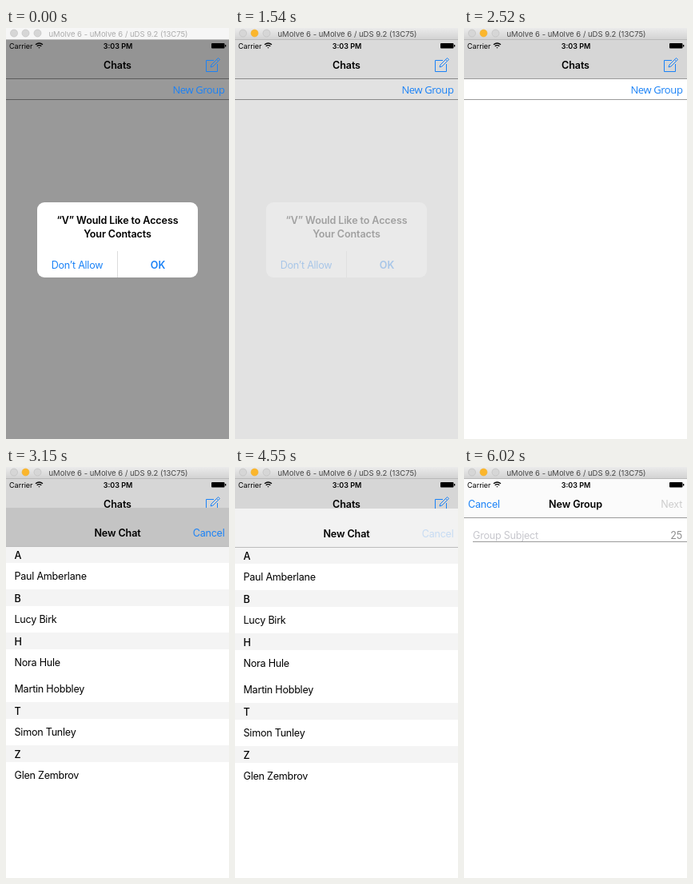
An HTML page that plays this animation: 279 px wide and 514 px high, repeating every 8000 ms.

```html
<!DOCTYPE html>
<html lang="en">
<head>
<meta charset="utf-8">
<title>Chats</title>
<style>
  html, body { margin: 0; width: 100%; height: 100%; overflow: hidden; background: #fff; }
  svg { display: block; width: 279px; height: 514px; }
  text { font: 400 12.6px Inter, "Open Sans", sans-serif; letter-spacing: -.02em; fill: #000; }
  .bold { font-weight: 600; letter-spacing: -.01em; }
  .letter { font-weight: 500; }
  .mid { text-anchor: middle; }
  .end { text-anchor: end; }
  .link { fill: #1a82f7; }
  .small { font-size: 9px; letter-spacing: 0; }
  .group { font: 400 13px "Open Sans", sans-serif; letter-spacing: -.03em; }
  .rule { stroke: #9a9a9a; }
  #windowTitle { font-size: 9.5px; letter-spacing: 0; }
</style>
</head>
<body>
<svg viewBox="0 0 279 514">
  <defs>
    <linearGradient id="chrome" x2="0" y2="1">
      <stop stop-color="#ebebeb"/><stop offset="1" stop-color="#d3d3d3"/>
    </linearGradient>
  </defs>

  <g id="chats">
    <rect y="15" width="279" height="499" fill="#fff"/>
    <rect id="chatsBar" y="15" width="279" height="48"/>
    <path class="rule" d="M0 63.5H279M0 89.5H279"/>
    <text class="bold mid" x="139.5" y="51">Chats</text>
    <rect id="dim" y="15" width="279" height="499"/>
    <g id="compose" fill="none" stroke="#1a82f7">
      <path d="M260 40.5H250.5V54.5H264.5V45"/>
      <path d="M256 49l1-3 8.500-8.500 2 2-8.500 8.500zM263.500 39.500l2 2"/>
    </g>
    <text id="newGroup" class="group link end" x="273.500" y="82">New Group</text>
  </g>

  <g id="contacts">
    <rect y="15" width="279" height="499" fill="#fff"/>
    <g id="list"></g>
    <rect id="contactsBar" y="15" width="279" height="48"/>
    <path class="rule" d="M0 63.5H279" opacity=".6"/>
    <text class="bold mid" x="139.5" y="51">New Chat</text>
    <text id="cancel" class="link end" x="273.500" y="51">Cancel</text>
  </g>

  <g id="subject">
    <rect y="15" width="279" height="499" fill="#fff"/>
    <rect y="15" width="279" height="48" fill="#fbfbfb"/>
    <path class="rule" d="M0 63.5H279M11 93.5H279"/>
    <text class="link" x="5" y="51">Cancel</text>
    <text class="bold mid" x="139.5" y="51">New Group</text>
    <text class="end" x="273" y="51" style="fill:#cdcdcd">Next</text>
    <text x="11" y="90" style="fill:#c7c7cd">Group Subject</text>
    <text class="end" x="273" y="90" style="fill:#8e8e8e">25</text>
  </g>

  <g id="status">
    <text class="small" x="4" y="26">Carrier</text>
    <g fill="none" stroke="#000" stroke-width="1.300">
      <path d="M37 20.800q4.500-3.600 9 0M38.700 22.700q2.800-2.200 5.600 0"/>
      <path d="M40.300 24.300h2.400l-1.200 1.200z" fill="#000" stroke="none"/>
    </g>
    <text class="small bold mid" x="140" y="26">3:03 PM</text>
    <rect x="257" y="19" width="16.500" height="6.500" rx="1"/>
    <rect x="274" y="21" width="1.300" height="2.500"/>
  </g>

  <g id="alert">
    <rect x="39" y="218" width="201" height="94" rx="9" fill="#fff"/>
    <path id="pressed" d="M139 279H240V303a9 9 0 0 1-9 9H139z" fill="#ebebeb"/>
    <path d="M139.5 279V312" stroke="#dcdcdc"/>
    <text class="bold mid" x="139.5" y="245">“V” Would Like to Access</text>
    <text class="bold mid" x="139.5" y="261.500">Your Contacts</text>
    <text class="link mid" x="89" y="300.500">Don’t Allow</text>
    <text class="link bold mid" x="190" y="300.500">OK</text>
  </g>

  <rect id="titleBar" width="279" height="14"/>
  <path d="M0 14.500H279" stroke="#b9b9b9"/>
  <g stroke-width=".6">
    <circle cx="10" cy="6.500" r="4.500" fill="#d6d6d6" stroke="#bdbdbd"/>
    <circle id="yellow" cx="24.500" cy="6.500" r="4.500"/>
    <circle cx="39.500" cy="6.500" r="4.500" fill="#d6d6d6" stroke="#bdbdbd"/>
  </g>
  <text id="windowTitle" x="53.500" y="10.500">uMolve 6 - uMolve 6 / uDS 9.2 (13C75)</text>
</svg>

<script>
  const LOOP = 8000, STEP = 70, TRAVEL = 499;
  const $ = id => document.getElementById(id);
  const set = (id, attr, value) => $(id).setAttribute(attr, value);
  const show = (id, on) => set(id, "visibility", on ? "visible" : "hidden");
  const gray = v => `rgb(${[v, v, v].map(Math.round)})`;
  const ramp = (t, from, to) => Math.min(1, Math.max(0, (t - from) / (to - from)));

  // Share of a critically damped spring's travel still to go.
  const remaining = (t, start, rate) => {
    const x = Math.max(0, t - start) / 1000 * rate;
    return (1 + x) * Math.exp(-x);
  };

  const sections = {
    A: ["Paul Amberlane"],
    B: ["Lucy Birk"],
    H: ["Nora Hule", "Martin Hobbley"],
    T: ["Simon Tunley"],
    Z: ["Glen Zembrov"]
  };

  let y = 63, rows = "";
  for (const [letter, names] of Object.entries(sections)) {
    rows += `<rect y="${y}" width="279" height="21" fill="#f4f4f4"/>
      <text class="letter" x="10.5" y="${y + 15.5}">${letter}</text>`;
    y += 21;
    for (const name of names) {
      rows += `<text x="10.5" y="${y + 21}">${name}</text>`;
      y += 33;
    }
  }
  $("list").innerHTML = rows;

  function slide(id, offset) {
    show(id, offset < TRAVEL - 1);
    set(id, "transform", `translate(0 ${Math.round(offset)})`);
  }

  function draw(t) {
    const active = t >= 1400;
    set("titleBar", "fill", active ? "url(#chrome)" : "#f6f6f6");
    set("yellow", "fill", active ? "#fbb62c" : "#d6d6d6");
    set("yellow", "stroke", active ? "#f0b030" : "#bdbdbd");
    $("windowTitle").style.fill = active ? "#454545" : "#ababab";

    const alert = t < 1820 ? remaining(t, 1430, 22.85) : 0;
    set("alert", "opacity", alert);
    set("dim", "opacity", .4 * alert);
    show("pressed", t >= 1400 && t < 1470);
    set("chatsBar", "fill", gray(246 - 32 * ramp(t, 1540, 1820)));

    set("compose", "opacity", t >= 2730 && t < 2940 ? .25 : 1);
    set("cancel", "opacity", t >= 4410 ? .2 : 1);
    set("newGroup", "opacity", t >= 5460 ? .25 : 1);

    set("contactsBar", "fill", gray(196 + 46 * ramp(t, 3500, 3780)));
    slide("contacts", t < 4500
      ? TRAVEL * remaining(t, 2915, 18.26)
      : t < 4830 ? TRAVEL * (1 - remaining(t, 4525.5, 18.26)) : TRAVEL);
    slide("subject", t < 6020 ? TRAVEL * remaining(t, 5505, 18.26) : 0);
  }

  const start = performance.now();
  function tick() {
    const t = (performance.now() - start) % LOOP;
    draw(Math.floor(t / STEP) * STEP);
    requestAnimationFrame(tick);
  }
  tick();
</script>
</body>
</html>
```
